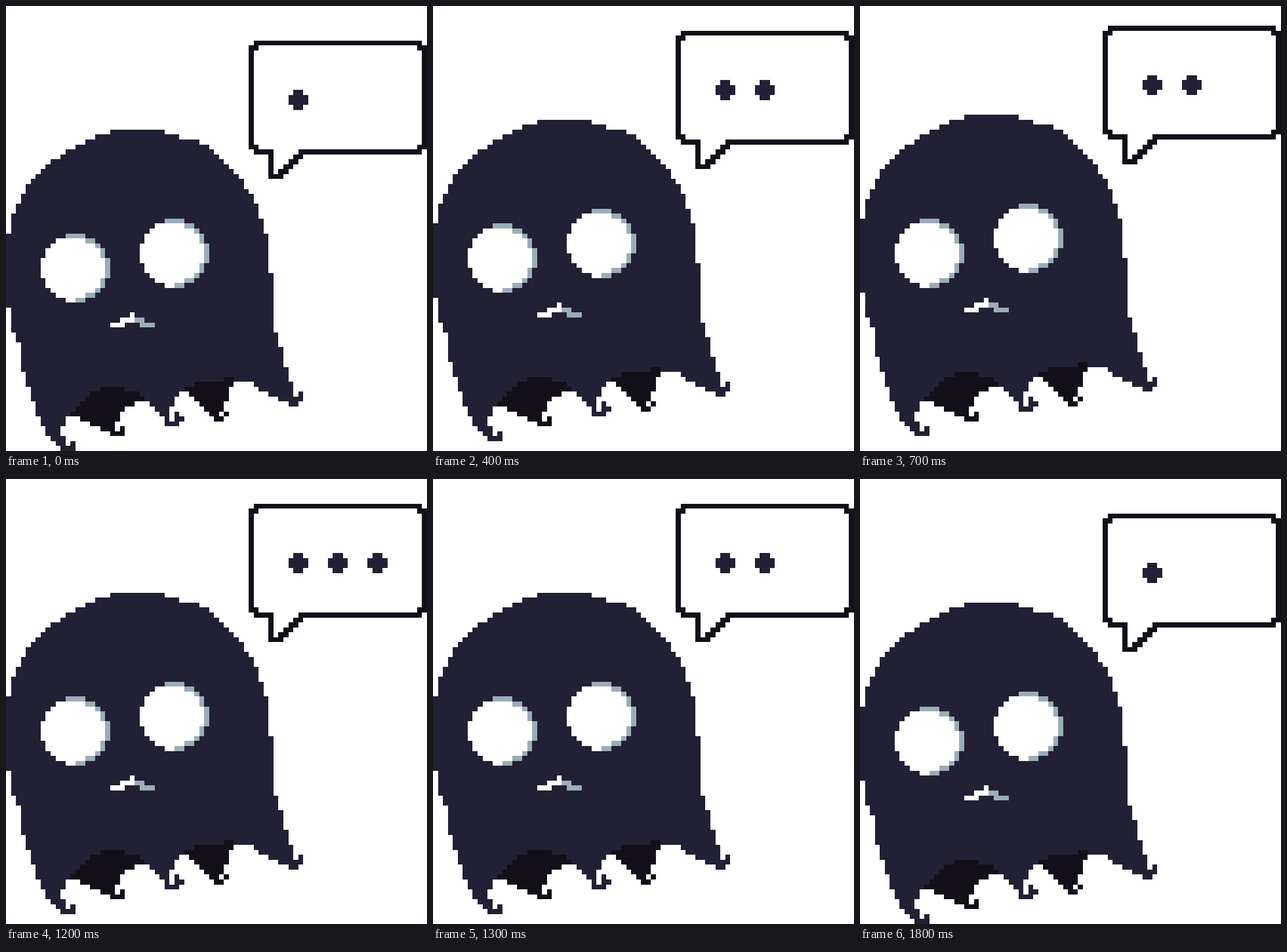
An HTML page that plays this animation: 727x770 px, repeating every 2100 ms.

```html
<!DOCTYPE html>
<html lang="en">
<head>
<meta charset="utf-8">
<title>Thinking ghost</title>
<style>
  html, body { margin: 0; width: 100%; height: 100%; overflow: hidden; background: #fff; }
  svg { display: block; width: 727px; height: 770px; }
  .ink { fill: #120f19; }
  .cloth { fill: #222034; }
  .shade { fill: #9badb7; }
  .light { fill: #fff; }
</style>
</head>
<body>
<!-- One unit is one cell of the 85 x 90 pixel-art grid. -->
<svg viewBox="0 0 85 90" preserveAspectRatio="none" shape-rendering="crispEdges">
  <defs>
    <g id="eye">
      <path class="shade" d="M5 0h4v1h2v1h1v1h1v2h1v4h-1v2h-1v1h-1v1h-2v1h-4v-1h-2v-1h-1v-1h-1v-2h-1v-4h1v-2h1v-1h1v-1h2z"/>
      <path class="light" d="M3 1h6v1h2v1h1v2h1v4h-1v2h-1v1h-2v1h-2v1h-2v-1h-2v-1h-1v-1h-1v-2h-1v-4h1v-2h1v-1h1z"/>
    </g>
    <path id="dot" class="cloth" d="M1 0h2v1h1v2h-1v1h-2v-1h-1v-2h1z"/>
  </defs>
  <g id="scene">
    <g class="cloth">
      <path d="M21 25h11v1h3v1h4v1h2v1h1v1h1v1h1v1h1v1h1v1h1v1h1v2h1v1h1v2h1v3h1v3H1v-4h1v-2h1v-2h1v-2h1v-1h1v-1h1v-1h1v-1h1v-1h2v-1h1v-1h2v-1h2v-1h2v-1h3z"/>
      <path d="M0 46H53v8h1v12h1v3h1v4h1v3H4v-2H3v-6H2v-2H1v-5H0z"/>
      <path d="M4 76H38v1h-2v1h-1v1h-1v2h-1v3h1v-2h1v1h1v1h-1v1h-3v-2h-1v-1h-1v-1h-1v-1h-1v-1H16v1h-1v1h-1v1h-1v1h-1v2h-1v2h1v2h1v-1h1v2h-3v-1h-1v-1h-1v-1h-1v-2h-1v-2h-1v-3h-1v-3h-1z"/>
      <path d="M50 76h8v3h1v-1h1v2h-1v1h-2v-1h-2v-1h-2v-1h-2v-1h-1z"/>
    </g>
    <g class="ink">
      <path d="M19 77H24v1H27v1H28v1H26v1H24v1H23v2H22v2H23v-1H24v2H21v-1H19v-1H17v-1H15v-1H13v-1H14v-1H15v-1H16v-1H17v-1H19z"/>
      <path d="M44 75H46v2H45v3H44v2H43v1H44v-1H45v1H44v1H42v-1H41v-1H40v-1H39v-1H38v-1H37v-1H36v-1H38v-1H44z"/>
      <path fill-rule="evenodd" d="M50 7H84v1H85v21H84v1H60v1H59v1H58v1H57v1H56v1H53V30H50v-1H49V8H50z
        M51 8H83v1H84V28H83v1H59v1H58v1H57v1H56v1H55v1H54V29H51V28H50V9H51z"/>
    </g>
    <use href="#eye" x="7" y="46"/>
    <use href="#eye" x="27" y="43"/>
    <path class="light" d="M25 62h1v2h-2v1h-3v-1h2v-1h2z"/>
    <path class="shade" d="M26 63h2v1h2v1h-3v-1h-1z"/>
    <use href="#dot" x="57" y="17"/>
    <use href="#dot" id="second" x="65" y="17"/>
    <use href="#dot" id="third" x="73" y="17"/>
  </g>
</svg>
<script>
  const LOOP = 2100;
  const RISES = [100, 400, 700], FALLS = [1200, 1500, 1800];
  const byId = id => document.getElementById(id);
  const scene = byId('scene'), second = byId('second'), third = byId('third');

  const countPassed = (times, t) => times.filter(time => t >= time).length;
  const showBetween = (el, t, from, to) =>
    el.setAttribute('visibility', t >= from && t < to ? 'visible' : 'hidden');

  function draw() {
    const t = performance.now() % LOOP;
    const lift = countPassed(RISES, t) - countPassed(FALLS, t);
    scene.setAttribute('transform', `translate(0 ${-lift})`);
    showBetween(second, t, 400, 1800);
    showBetween(third, t, 900, 1300);
    requestAnimationFrame(draw);
  }
  draw();
</script>
</body>
</html>
```
